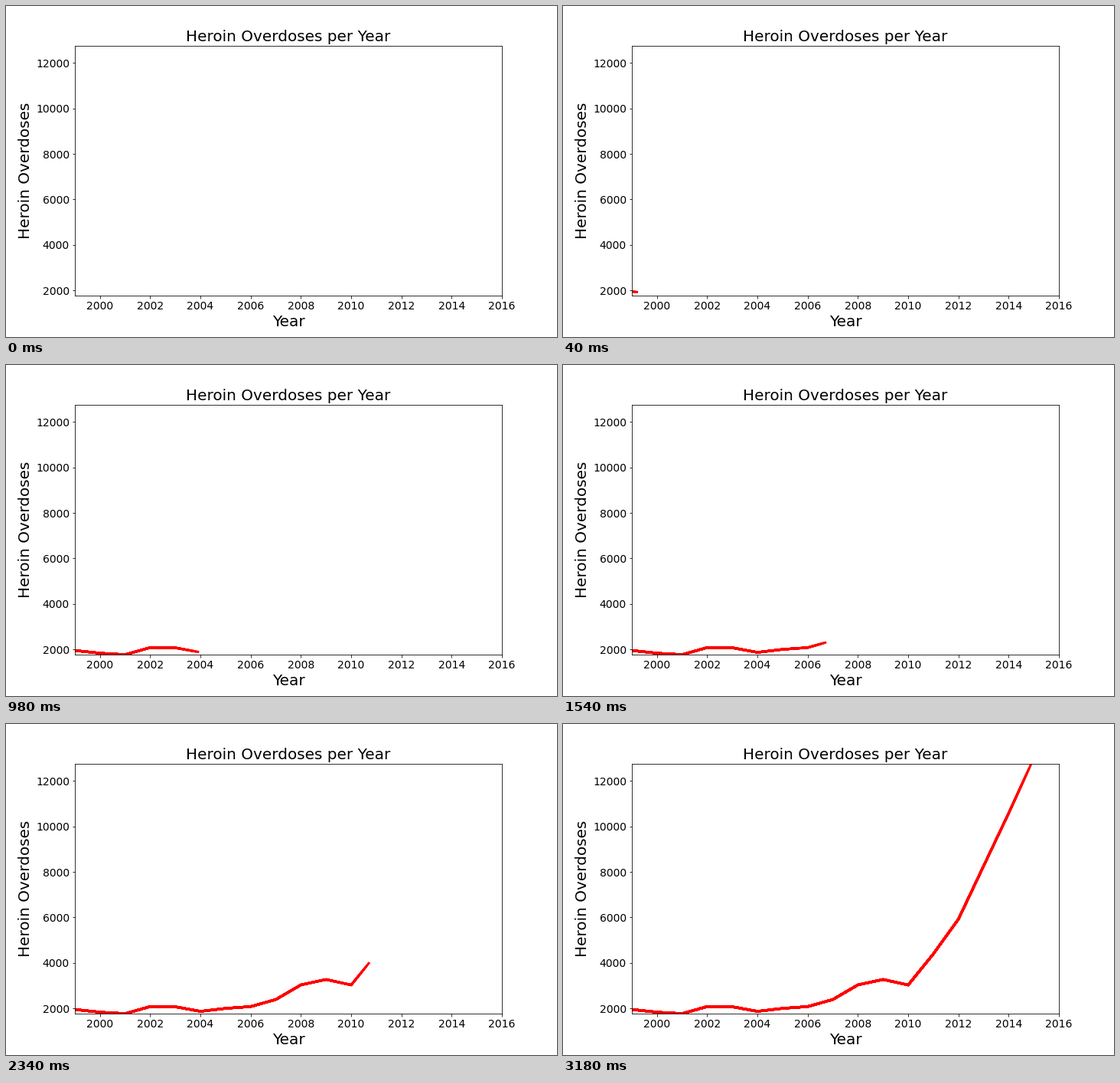
A matplotlib script for the animation above (3200 ms loop, 720 by 432 pixels).

```python
import matplotlib.pyplot as plt
import numpy as np
from matplotlib.animation import FuncAnimation

STEPS = 10        # points per year
INTERVAL = 20     # ms
FLASH = 1         # index of the single dark flash

deaths = [1960, 1842, 1779, 2089, 2080, 1878, 2009, 2088, 2399,
          3041, 3278, 3036, 4397, 5925, 8257, 10574, 12989]
first = 1999
count = (len(deaths) - 1) * STEPS
years = first + np.arange(count) / STEPS
values = np.interp(years, first + np.arange(len(deaths)), deaths)

plt.rcParams["font.family"] = "DejaVu Sans"
fig = plt.figure(figsize=(10, 6), dpi=72, facecolor="white")
ax = fig.add_axes([0.125, 0.125, 0.775, 0.755])
ax.set_xlim(first, 2016)
ax.set_ylim(values.min(), values.max())
ax.set_xticks(range(2000, 2017, 2))
ax.set_yticks(range(2000, 12001, 2000))
ax.tick_params(labelsize=14)
ax.set_xlabel("Year", fontsize=20)
ax.set_ylabel("Heroin Overdoses", fontsize=20)
ax.set_title("Heroin Overdoses per Year", fontsize=20)

# Each step lays a longer stroke over the earlier ones, so older
# parts of the curve get firmer edges than the fresh tip.
strokes = [ax.plot(years[:n + 1], values[:n + 1], color="red", lw=3,
                   solid_capstyle="projecting", visible=False)[0]
           for n in range(count)]


def update(i):
    flash = i == FLASH
    back = "#282828" if flash else "white"
    fig.set_facecolor(back)
    ax.set_facecolor(back)
    for n, stroke in enumerate(strokes):
        stroke.set_visible(n <= i)
        stroke.set_color("black" if flash else "red")
    return strokes


anim = FuncAnimation(fig, update, frames=count, interval=INTERVAL,
                     repeat=True, repeat_delay=0, blit=False)
plt.show()
```
